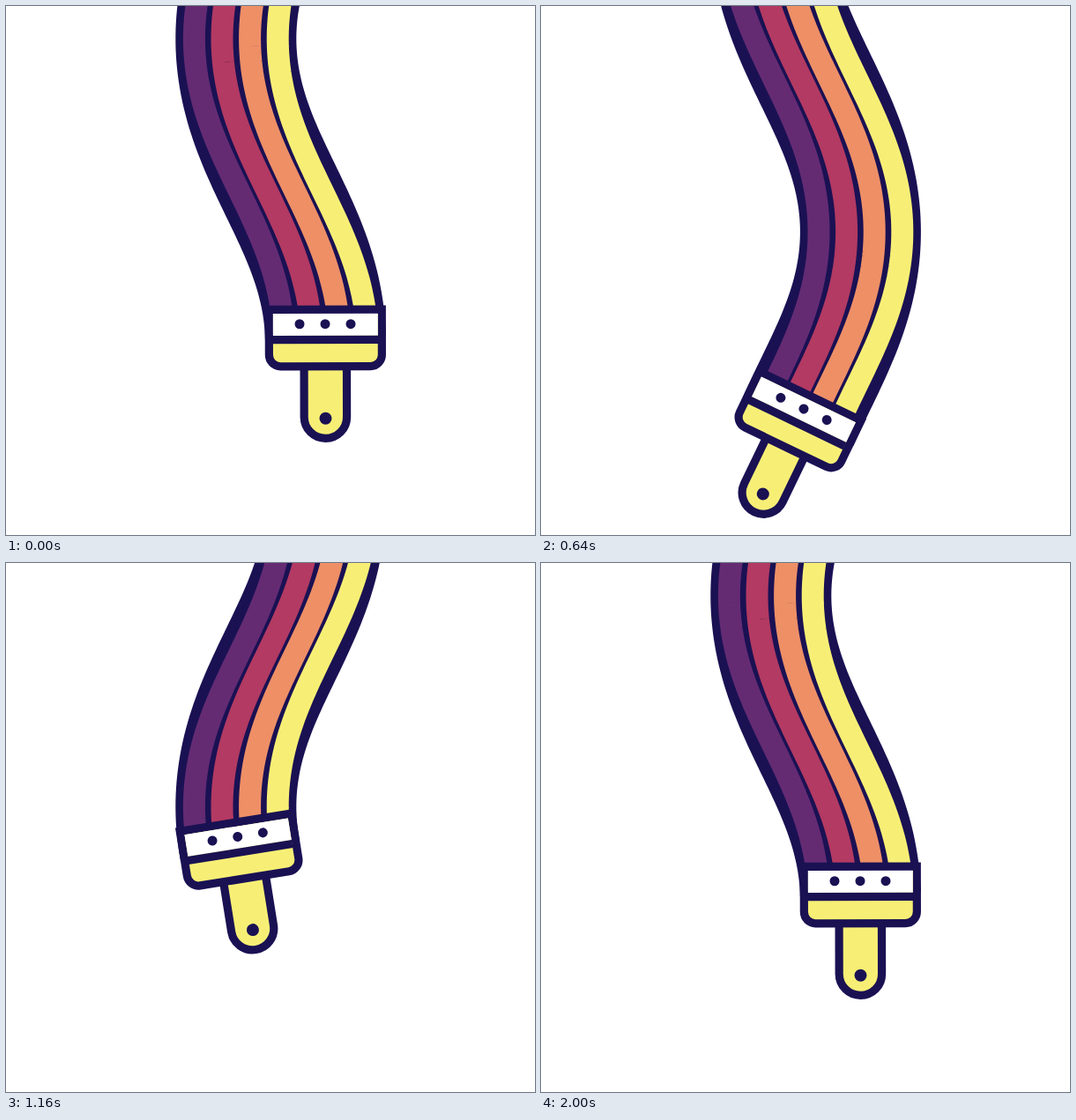
These frames come from a looping animation (600x600 px, 2.04 s). An HTML page:

```html
<!DOCTYPE html>
<html lang="en">
<head>
<meta charset="utf-8">
<title>Paint brush</title>
<style>
  html, body { margin: 0; width: 100%; height: 100%; overflow: hidden; background: #fff; }
  svg { display: block; width: 100%; height: 100%; }
  .stripe { fill: none; stroke-width: 25; stroke-linejoin: round; }
  .outline { fill: none; stroke: #1a1153; stroke-width: 137; stroke-linejoin: round; }
  .part { fill: #f7ef75; stroke: #1a1153; stroke-width: 9.2; }
  .ink { fill: #1a1153; }
</style>
</head>
<body>
<svg viewBox="0 0 600 600">
  <g id="ribbon">
    <path class="outline"/>
    <path class="stripe" stroke="#642b73" transform="translate(-47.4)"/>
    <path class="stripe" stroke="#b33a62" transform="translate(-15.8)"/>
    <path class="stripe" stroke="#ee8f66" transform="translate(15.8)"/>
    <path class="stripe" stroke="#f7ef75" transform="translate(47.4)"/>
  </g>
  <!-- origin is the middle rivet -->
  <g id="brush">
    <path class="part" d="M-24 45V105.5a24.2 24.2 0 0 0 48.4 0V45Z"/>
    <path class="part" d="M-63.7-16.4H64.3V35a13 13 0 0 1-13 13H-50.7a13 13 0 0 1-13-13Z"/>
    <rect x="-59.1" y="-11.8" width="118.8" height="25" fill="#fff"/>
    <rect class="ink" x="-60" y="13.2" width="120" height="9.2"/>
    <circle class="ink" cx="-29" r="5.5"/>
    <circle class="ink" r="5.5"/>
    <circle class="ink" cx="29" r="5.5"/>
    <circle class="ink" cx=".3" cy="107" r="7"/>
  </g>
</svg>
<script>
  const LOOP = 2040, STEP = 40, FIRST_HOLD = 80;
  const WAVE = 690, CREST = 382, BOB = 105;
  const { sin, cos, PI } = Math;
  const paths = document.querySelectorAll('#ribbon path');
  const brush = document.getElementById('brush');

  const waveX = p => 311.6 + 51.4 * cos(p) - 0.6 * cos(3 * p);

  function ribbonPath(a, bob) {
    const end = 376 + bob;
    const points = [];
    for (let y = end; y > -110; y -= 6) {
      const phase = 2 * PI * (y - bob - CREST) / WAVE + a;
      points.push(waveX(phase).toFixed(2) + ' ' + y.toFixed(2));
    }
    return 'M' + points.join('L');
  }

  function draw(ms) {
    const a = ms < FIRST_HOLD ? 0 : 2 * PI * ms / 2000;
    const s = sin(a), c = cos(a), c3 = cos(3 * a);
    const bob = BOB * s;

    const d = ribbonPath(a, bob);
    paths.forEach(p => p.setAttribute('d', d));

    const x = 311.75 + 50.84 * c + 9.38 * s - 0.59 * c3;
    const y = 360.7 + bob + 1.5 * s * s;
    const tilt = 1.4 + 25.4 * s - 2.03 * c + 0.53 * c3;
    brush.setAttribute('transform', `translate(${x} ${y}) rotate(${tilt})`);
  }

  const start = performance.now();
  function tick() {
    // small lead keeps steps stable against timer rounding
    const t = (performance.now() - start + 2) % LOOP;
    draw(Math.floor(t / STEP) * STEP);
    requestAnimationFrame(tick);
  }
  tick();
</script>
</body>
</html>
```
